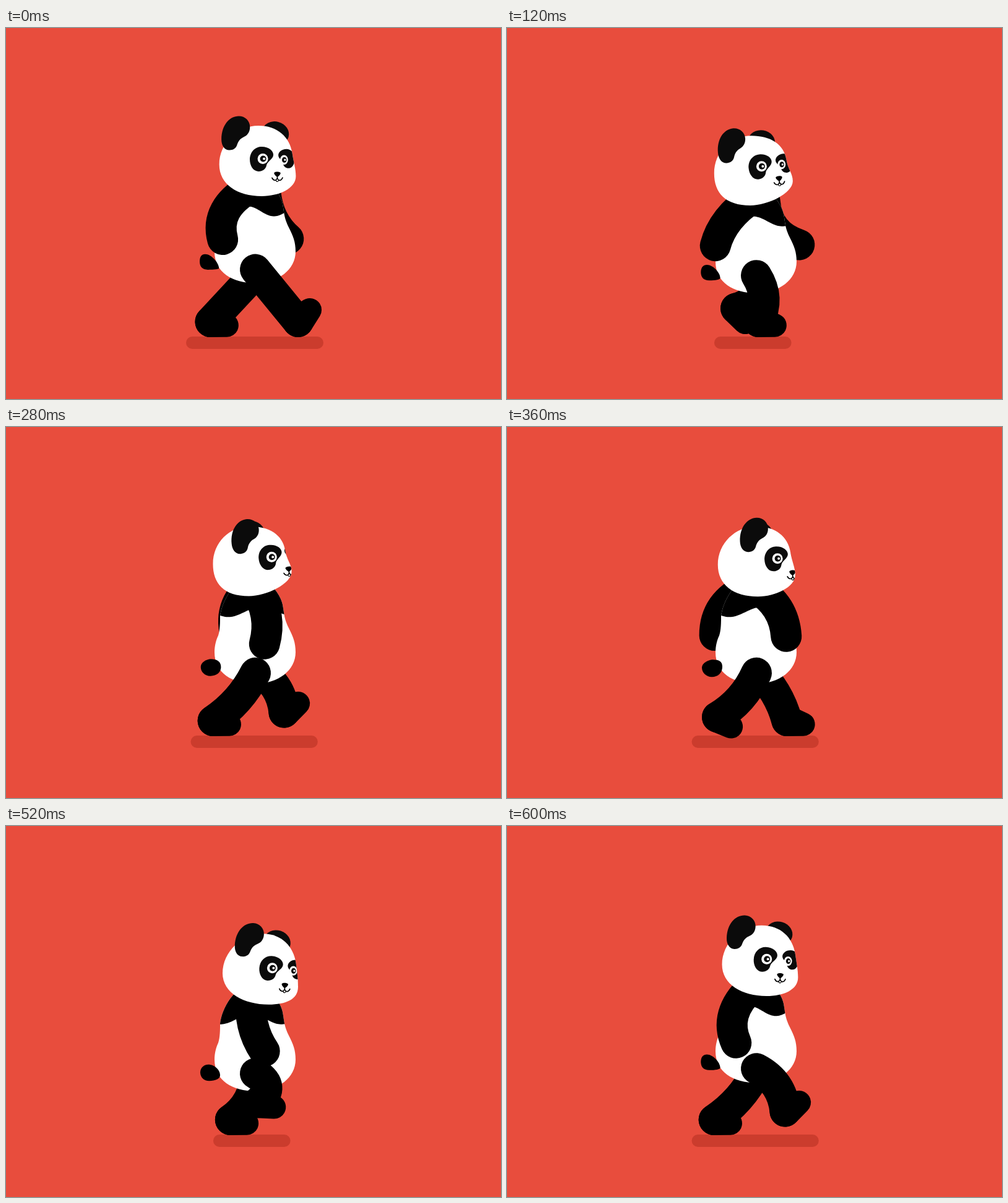
An HTML page with a canvas for the animation above (0.64 s loop, 800x600 px).

```html
<!DOCTYPE html>
<html lang="en">
<head>
<meta charset="utf-8">
<title>Walking panda</title>
<style>
  html, body { margin: 0; width: 100%; height: 100%; overflow: hidden; background: #e84d3d; }
  canvas { display: block; }
</style>
</head>
<body>
<canvas id="stage" width="800" height="600"></canvas>
<script>
const ctx = document.getElementById('stage').getContext('2d');
const LOOP = 640, STEP = 40, RAD = Math.PI / 180;
const BLACK = '#000', SOOT = '#0b0b0b', WHITE = '#fff';

const TORSO = new Path2D('M397 240C425 240 444 268 447 284C450 300 449 305 457 322C464 336 468 345 468 361C468 390 440 412 403 412C366 412 337 395 337 361C337 350 340 340 343 334C346 325 346 312 346 305C346 288 364 243 397 240Z');
const EAR = new Path2D('M5-27.5C15-27.5 23-20 23-10C23-1 18 4 13 6C7 9 4 13 2 20C0 25-4 27.5-10 27.5C-18 27.5-23 20-23 10C-23-13-10-27.5 5-27.5Z');
const PATCH = new Path2D('M0-20C12-20 19-13 19-7C19 0 9 4 8 10C7 16 2 20-5 20C-14 20-19 10-19 1C-19-12-10-20 0-20Z');
const NOSE = new Path2D('M0 4.5C-3 3-6-1-5-2.5C-3-4.5 3-4.5 5-2.5C6-1 3 3 0 4.5Z');
const MOUTH = new Path2D('M0 3V6Q-1 10-4 9.8Q-7 9.5-8.5 6M0 6Q1 10 4 9.8Q7 9.5 8.5 5.5');

// Cosine of the walk cycle, delayed by some degrees.
const wave = (t, delay = 0) => Math.cos(2 * Math.PI * t / LOOP - delay * RAD);
// Cosine that repeats with every step, twice per cycle.
const stepWave = t => wave(2 * t);

function at(x, y, draw, tilt = 0, sx = 1, sy = 1) {
  ctx.save();
  ctx.translate(x, y);
  ctx.rotate(tilt);
  ctx.scale(sx, sy);
  draw();
  ctx.restore();
}

function fill(path, color) {
  ctx.fillStyle = color;
  ctx.fill(path);
}

function oval(x, y, rx, ry, color, tilt = 0) {
  const p = new Path2D();
  p.ellipse(x, y, rx, ry, tilt, 0, 2 * Math.PI);
  fill(p, color);
}

function limb(x0, y0, cx, cy, x1, y1) {
  ctx.beginPath();
  ctx.moveTo(x0, y0);
  ctx.quadraticCurveTo(cx, cy, x1, y1);
  ctx.strokeStyle = BLACK;
  ctx.lineWidth = 50;
  ctx.lineCap = 'round';
  ctx.stroke();
}

function shadow(t) {
  const x = 399.25 + 2.75 * stepWave(t);
  const half = 82.5 + 28.5 * stepWave(t);
  const p = new Path2D();
  p.roundRect(x - half, 499, 2 * half, 20, 10);
  fill(p, '#cb3c2d');
}

// Hull of a heel circle and a toe circle.
function foot(x, y, angle) {
  const heel = 25, toe = 19, length = 27;
  const b = Math.acos((heel - toe) / length);
  const p = new Path2D();
  p.arc(x, y, heel, angle + b, angle - b + 2 * Math.PI);
  p.arc(x + length * Math.cos(angle), y + length * Math.sin(angle), toe, angle - b, angle + b);
  p.closePath();
  fill(p, BLACK);
}

// First half of the cycle: the foot slides back on the ground. Second half: it swings forward.
function stride(t) {
  const front = 472, back = 330.5, ground = 475;
  const phase = 2 * (t % LOOP) / LOOP;
  if (phase < 1) {
    const u = phase, slide = u + u * u - u ** 3;
    return {
      x: front + (back - front) * slide,
      y: ground,
      angle: 12.5 - 57.5 * Math.max(0, 1 - 8 * u),
      bend: 22 * Math.sqrt(Math.sin(Math.PI * u))
    };
  }
  const u = phase - 1, swing = u ** 1.3, arch = Math.sin(Math.PI * swing);
  return {
    x: back + (front - back) * swing,
    y: ground - 28 * arch,
    angle: 12.5 - 57.5 * u + 66 * Math.sin(Math.PI * u ** 0.7) ** 2,
    bend: 33 * Math.sqrt(arch)
  };
}

function leg(t, bob) {
  const hipX = 403;
  const hipY = 397 + bob / 4 - 6.5 * Math.max(0, wave(t)) ** 2;
  const { x, y, angle, bend } = stride(t);
  const dx = x - hipX, dy = y - hipY, size = Math.hypot(dx, dy);
  const kneeX = (hipX + x) / 2 + bend * dy / size;
  const kneeY = (hipY + y) / 2 - bend * dx / size;
  limb(hipX, hipY, kneeX, kneeY, x, y);
  foot(x, y, angle * RAD);
}

function nearArm(t) {
  const hand = wave(t, 45), elbow = wave(t, 35);
  limb(399 - 4 * wave(t), 258,
       390 - 58 * wave(t, 23), 308 - 25 * elbow ** 2,
       394 - 62 * hand, 350 - 17 * hand ** 2);
}

function farArm(t) {
  const hand = wave(t, 45);
  limb(405 + 16 * wave(t, 25), 262 + 5 * wave(t),
       383 + 48 * wave(t, 30), 299 + 20 * hand,
       404 + 74 * hand, 350 - 19 * hand ** 2);
}

// The scalloped chest fur slides sideways as the shoulders twist.
function torso(t) {
  const twist = wave(t);
  const left = 350 - 10 * twist, crest = 401.5 - 10.7 * twist, right = 452 - 19 * twist;
  fill(TORSO, WHITE);
  ctx.save();
  ctx.clip(TORSO);
  ctx.beginPath();
  ctx.moveTo(330, 230);
  for (let x = 330; x <= 474; x += 2) {
    const dip = x < crest ? left : right;
    ctx.lineTo(x, 296 + 8 * Math.cos(Math.PI * (x - dip) / (crest - dip)));
  }
  ctx.lineTo(474, 230);
  ctx.fillStyle = BLACK;
  ctx.fill();
  ctx.restore();
}

function tail(wag) {
  const topX = 327 + 5.5 * wag, topY = 369 + 4 * wag;
  const tipX = 346 + 2 * wag, tipY = 386.5 - 2 * wag;
  const lowX = 328.5 + 2.5 * wag, lowY = 395.5 + 5.5 * wag;
  const leftX = 314 + wag, leftY = 381.5 + 4.5 * wag;
  const p = new Path2D();
  p.moveTo(leftX, leftY);
  p.bezierCurveTo(leftX, leftY - 8, topX - 6, topY, topX, topY);
  p.bezierCurveTo(topX + 10, topY, tipX, tipY - 9, tipX, tipY);
  p.bezierCurveTo(tipX, tipY + 0.6 * (lowY - tipY), lowX + 10, lowY, lowX, lowY);
  p.bezierCurveTo(lowX - 9, lowY, leftX, leftY + 8, leftX, leftY);
  fill(p, BLACK);
}

// Head outline; sway runs from -1 (back) to 1 (forward).
function skull(sway) {
  const leftX = 341 + 9 * sway, leftY = 219.5 + 1.7 * sway;
  const topX = 403 + 12 * sway, topY = 157.5;
  const browX = 458.5 + 10 * sway, browY = 200 + 4.5 * sway;
  const cheekX = 466 + 6 * sway, cheekY = 236 + 7.5 * sway;
  const chinX = 406 + 18.5 * sway, chinY = 271 + sway;
  const p = new Path2D();
  p.moveTo(leftX, leftY);
  p.bezierCurveTo(leftX, leftY - 35, topX - 33, topY, topX, topY);
  p.bezierCurveTo(topX + 31, topY, browX - 4, browY - 26, browX, browY);
  p.bezierCurveTo(browX + 2, browY + 14, cheekX, cheekY - 12, cheekX, cheekY);
  p.bezierCurveTo(cheekX, cheekY + 20, chinX + 28, chinY, chinX, chinY);
  p.bezierCurveTo(chinX - 40, chinY, leftX, leftY + 32, leftX, leftY);
  return p;
}

function eye(x, y, sx = 1, sy = 1) {
  at(x, y, () => {
    oval(0, 0, 8.5, 8.5, WHITE);
    oval(0.5, 0, 5, 5, SOOT);
    oval(2, 0, 2, 2, WHITE);
  }, 0, sx, sy);
}

function muzzle() {
  fill(NOSE, BLACK);
  ctx.strokeStyle = BLACK;
  ctx.lineCap = 'round';
  ctx.lineWidth = 1.7;
  ctx.stroke(MOUTH);
  oval(0, 10, 2.5, 2.5, BLACK);
  oval(0, 10, 1.4, 1.4, WHITE);
}

// Features follow the sway of the head and its turn away from the viewer.
function head(sway, turn) {
  const tilt = (5 * sway - 1.7) * RAD;
  const shape = skull(sway);
  const nearX = 422.5 + 6 * sway + 12.8 * turn, nearY = 210 + 3.5 * sway;
  const farX = 461 + 7.5 * sway + 11.5 * turn, farY = 207.5 + 8 * sway;
  oval(418 + 20 * sway - 10 * turn, 169 + 2 * sway, 22, 19, SOOT, tilt + 0.25);
  fill(shape, WHITE);
  ctx.save();
  ctx.clip(shape);
  at(nearX, nearY, () => fill(PATCH, SOOT), tilt);
  eye(nearX + 2, nearY - 0.5);
  at(farX, farY, () => fill(PATCH, SOOT), tilt, -0.7, 0.78);
  eye(farX - 4, farY + 2, 0.75, 0.9);
  at(449.3 + 1.5 * sway + 12.3 * turn, 232.5 + 8.5 * sway, muzzle, tilt);
  ctx.restore();
  at(382.5 + 11 * sway + 17 * turn, 171 - 3.5 * sway, () => fill(EAR, SOOT), tilt);
}

function draw(t) {
  const bob = 10 - 9.5 * stepWave(t);
  const sway = wave(t, -66), turn = -wave(t, 22);
  const bobbed = part => at(0, bob, part);
  ctx.clearRect(0, 0, 800, 600);
  shadow(t);
  bobbed(() => farArm(t));
  leg(t + LOOP / 2, bob);
  bobbed(() => {
    torso(t);
    tail(turn);
  });
  leg(t, bob);
  bobbed(() => {
    nearArm(t);
    head(sway, turn);
  });
}

const start = performance.now();
function tick(now) {
  const t = Math.max(0, now - start) % LOOP;
  draw(Math.floor(t / STEP) * STEP);
  requestAnimationFrame(tick);
}
tick(start);
</script>
</body>
</html>
```
